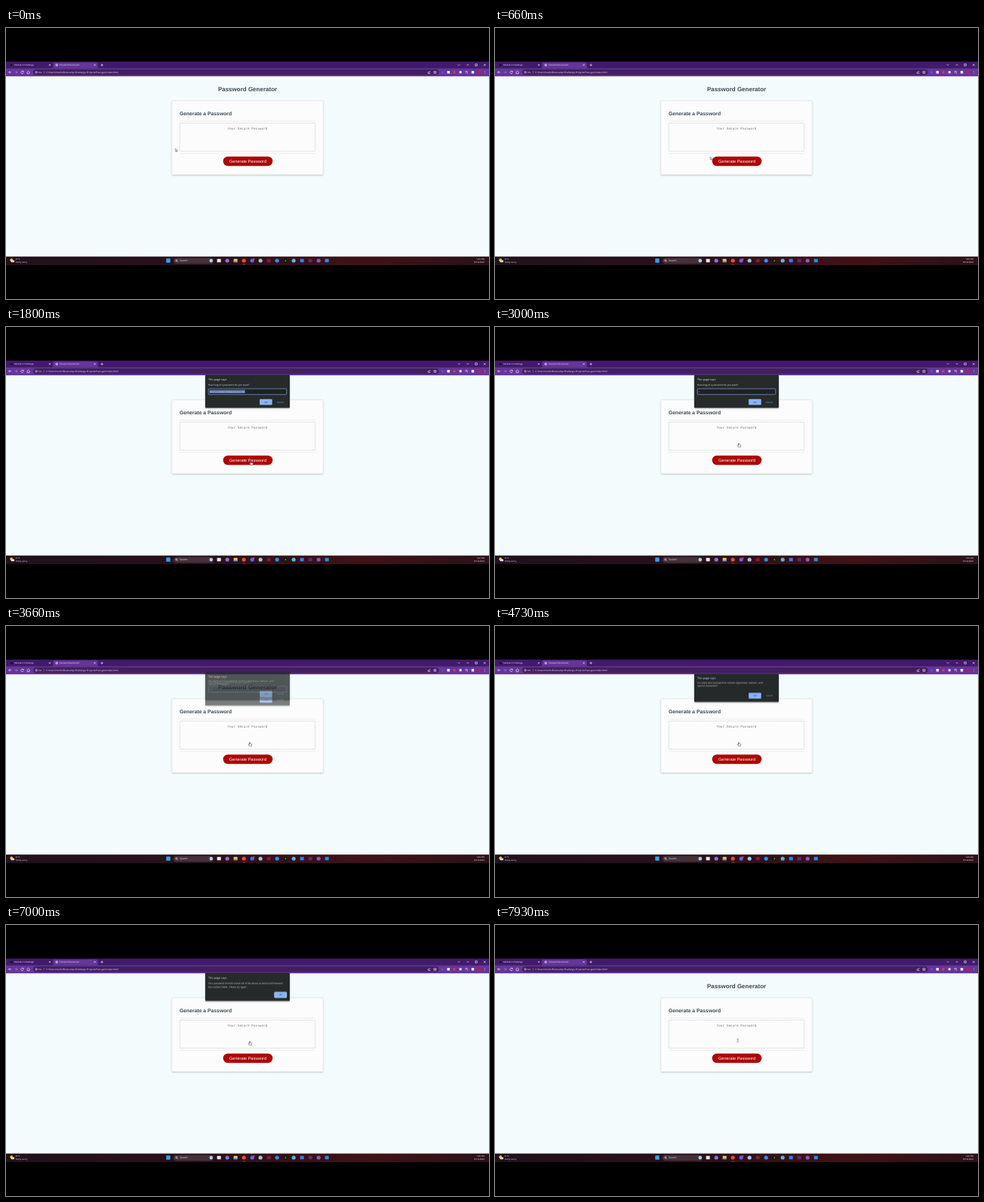
These frames come from a looping animation (640x360 px, 8000 ms). An HTML page:

```html
<!DOCTYPE html>
<html lang="en">
<head>
<meta charset="utf-8">
<title>Password Generator</title>
<style>
  html, body { margin: 0; width: 100%; height: 100%; overflow: hidden; background: #000; }
  svg { display: block; width: 100vw; height: 100vh; }
  text { font-family: "Open Sans", "Noto Sans", sans-serif; text-rendering: geometricPrecision; white-space: pre; }
  .page text { font-family: "Liberation Sans", Arial, sans-serif; fill: #3b4954; }
  .page .mono { font-family: "Liberation Mono", monospace; fill: #777; }
  .ui { font-size: 2.8px; fill: #f1eaf8; }
  .line { fill: none; stroke: #eee6f6; stroke-width: .65; }
  .dialog text { font-size: 3.08px; fill: #e4e6e9; }
  .dialog .head { font-size: 3.65px; }
  .dialog .ok { font-size: 2.9px; fill: #24334f; text-anchor: middle; }
  .dialog .cancel { font-size: 2.9px; fill: #8ab4f8; text-anchor: middle; }
  .dialog .value { font-size: 2.8px; }
  .dialog, .pointer, .entry { opacity: 0; }
</style>
</head>
<body>
<svg viewBox="0 0 640 360" preserveAspectRatio="none">
  <defs>
    <linearGradient id="bar">
      <stop offset="0" stop-color="#21111c"/>
      <stop offset=".4" stop-color="#29101a"/>
      <stop offset=".75" stop-color="#401218"/>
      <stop offset="1" stop-color="#2b1119"/>
    </linearGradient>
    <filter id="soft" x="-10%" y="-10%" width="120%" height="125%">
      <feDropShadow dx="0" dy=".6" stdDeviation="1" flood-opacity=".28"/>
    </filter>
  </defs>
  <rect width="640" height="360"/>

  <g class="page">
    <rect y="64" width="640" height="240" fill="#f4fbfc"/>
    <text x="320" y="84.2" font-size="8" font-weight="700" text-anchor="middle">Password Generator</text>
    <rect x="220" y="97" width="200" height="97.7" rx="1" fill="#fcfcfc" stroke="#d8dadb" stroke-width=".3" filter="url(#soft)"/>
    <text x="230" y="115.7" font-size="6.8" font-weight="700">Generate a Password</text>
    <path d="M230 123.6H410M230 166.6H410" stroke="#dcdede" stroke-width=".5"/>
    <rect x="230.3" y="126.3" width="179.4" height="37.4" rx=".8" fill="#fcfcfc" stroke="#b4b7b9" stroke-width=".55" stroke-dasharray="1.5 .9"/>
    <text class="mono" x="320" y="134.9" font-size="4.42" text-anchor="middle">Your Secure Password</text>
    <rect x="287.7" y="170.8" width="65.6" height="12.5" rx="6.2" fill="#ae0505"/>
    <text x="320.5" y="178.8" font-size="5.55" text-anchor="middle" style="fill:#fff">Generate Password</text>
  </g>

  <g id="browser">
    <rect y="44.6" width="640" height="9" fill="#421a6c"/>
    <path d="M61 53.6Q62.5 53.4 62.5 51.6V47.4Q62.5 45.8 64 45.8H120Q121.5 45.8 121.5 47.4V51.6Q121.5 53.4 123 53.6Z" fill="#66359b"/>
    <rect y="53.4" width="640" height="10.8" fill="#66359b"/>
    <rect x="36" y="55" width="537.5" height="7.6" rx="3.8" fill="#41205f"/>
    <circle cx="7.2" cy="49.2" r="1.5" fill="#17111d"/>
    <circle cx="67.2" cy="49.2" r="1.3" class="line"/>
    <path d="M66 49.2H68.4" class="line"/>
    <g class="ui">
      <text x="11" y="50.2">Module 3 Challenge</text>
      <text x="71" y="50.2">Password Generator</text>
      <text x="43" y="59.9">File</text>
      <text x="53" y="60" font-size="3.08">C:/Users/marlo/Bootcamp/Challenge-Projects/Pass-gen/index.html</text>
    </g>
    <g class="line">
      <path d="M57 48.2l2 2m0-2l-2 2M116.6 48.2l2 2m0-2l-2 2M125.4 49.2h3.4m-1.7-1.7v3.4"/>
      <path d="M598.8 48.3l1.3 1.3 1.3-1.3M610.6 49h2.8M621.8 47.8h2.5v2.5h-2.5zM633 47.8l2.6 2.6m0-2.6l-2.6 2.6"/>
      <path d="M7.2 58.8H3.6m1.6-1.6l-1.6 1.6 1.6 1.6"/>
      <path d="M11.4 58.8H15m-1.6-1.6l1.6 1.6-1.6 1.6" opacity=".45"/>
      <path d="M23 58a1.7 1.7 0 1 0 .2 1.4M23.2 56.9v1.3h-1.3"/>
      <path d="M27.6 58.8l2-1.8 2 1.8M28.2 58.5v2.2h2.8v-2.2"/>
      <circle cx="40.2" cy="58.8" r="1.2"/>
      <path d="M50.3 57.2v3.2" opacity=".5"/>
      <path d="M559.3 58.2v2.2h2.7v-1M560.3 59q.3-1.4 2-1.4"/>
      <path d="M568.4 56.9l.6 1.3 1.4.1-1.1.9.4 1.4-1.3-.8-1.2.8.3-1.4-1.1-.9 1.4-.1z"/>
      <path d="M608.6 57.6h3.2M608.6 59h2M611.4 58.6v2"/>
    </g>
  </g>

  <g id="taskbar">
    <rect y="303.6" width="640" height="11.4" fill="url(#bar)"/>
    <circle cx="7.3" cy="308.3" r="2" fill="#f5bd34"/>
    <rect x="6.5" y="308.6" width="4.8" height="2.7" rx="1.3" fill="#d9dde3"/>
    <rect x="222" y="305.4" width="53" height="7.8" rx="3.9" fill="#443039"/>
    <circle cx="225.8" cy="308.8" r="1.1" class="line"/>
    <path d="M226.6 309.6l1.1 1.1" class="line"/>
    <rect x="313.3" y="313.7" width="4" height=".6" rx=".3" fill="#d26a74"/>
    <g class="ui">
      <text x="12.8" y="308.2" font-size="2.7">81°F</text>
      <text x="12.8" y="311.8" font-size="2.7">Partly sunny</text>
      <text x="230" y="310.2" font-size="3.4">Search</text>
      <g text-anchor="end" font-size="2.9">
        <text x="634" y="308.2">1:49 PM</text>
        <text x="634" y="312">8/10/2023</text>
      </g>
    </g>
  </g>

  <g class="dialog" id="prompt">
    <text x="268" y="78.3">How long of a password do you want?</text>
    <rect x="268.2" y="82" width="103.6" height="7.7" rx=".9" fill="#1f2023" stroke="#8ab4f8" stroke-width=".6"/>
    <g class="entry" id="hint">
      <rect x="269.6" y="83.6" width="47.2" height="4.4" fill="#5878a8"/>
      <text class="value" x="270" y="86.9">Enter a number between 8 and 128</text>
    </g>
    <text class="value entry" id="digit1" x="270" y="86.9">1</text>
    <text class="value entry" id="digit2" x="271.6" y="86.9">2</text>
  </g>
  <g class="dialog" id="confirm">
    <text x="268" y="76.3">You want your password to contain uppercase, numeric, and</text>
    <text x="268" y="80.9">special characters?</text>
  </g>
  <g class="dialog" id="alert">
    <text x="268" y="78.3">Your password should contain all of the above as well as full between</text>
    <text x="268" y="83">the number fields.  Please try again.</text>
  </g>

  <g id="mouse">
    <path class="pointer" id="arrow" d="M0 0V4.1L1 3.2 1.6 4.6 2.2 4.3 1.6 3H2.9Z" fill="#fff" stroke="#111" stroke-width=".4"/>
    <path class="pointer" id="hand" d="M-.5 .4Q0-.2.5.4V2L2.4 2.4Q2.9 2.6 2.8 3.2L2.3 5.2H-.5L-1.9 3.2Q-1.9 2.4-1.2 2.6L-.5 3.2Z" fill="#fff" stroke="#111" stroke-width=".45"/>
    <path class="pointer" id="beam" d="M-1-2.2Q0-2.2 0-1.6Q0-2.2 1-2.2M0-1.6V1.8M-1 2.3Q0 2.3 0 1.8Q0 2.3 1 2.3" fill="none" stroke="#222" stroke-width=".45"/>
  </g>
</svg>
<script>
const LOOP = 8000;
const byId = id => document.getElementById(id);
const dot = (x, y, r, fill) => `<circle cx="${x}" cy="${y}" r="${r}" fill="${fill}"/>`;
const box = (x, y, w, fill, h = w, rx = .5) =>
  `<rect x="${x - w / 2}" y="${y - h / 2}" width="${w}" height="${h}" rx="${rx}" fill="${fill}"/>`;
const append = (id, markup) => byId(id).insertAdjacentHTML('beforeend', markup);

append('browser',
  dot(578.5, 58.8, 1.6, '#3a62d8') + box(586.3, 58.8, 3.6, '#e8e4f2') +
  dot(594, 58.8, 1.7, '#d8404a') + box(602.2, 58.8, 3, '#f2eef8') +
  box(618.5, 58.8, 3.4, '#f2eef8') + dot(627, 58.8, 2.1, '#c81d38') +
  [57.3, 58.8, 60.3].map(y => dot(634.3, y, .4, '#fff')).join(''));

// Taskbar icons sit on an even 11 px pitch: 'o' round, 's' square.
const icons = [
  's#e6e8ee', 'o#7c78d8', 's#f4c84a', 'o#e0503c', 'o#5865f2', 'o#9fc4e4', 's#7a1f3c',
  'o#2f8fe8', 's#101a12', 'o#58b8dc', 's#3a7bea', 's#5c2a6e', 'o#8a55c8', 's#2590dc'
];
append('taskbar', box(215, 309, 5.4, '#2ea3ee') + dot(271.8, 309.1, 2.3, '#a5d4ee') +
  icons.map((icon, i) => {
    const x = 282.2 + 11 * i, fill = icon.slice(1);
    return icon[0] === 'o' ? dot(x, 309, 2.6, fill) : box(x, 309, 5, fill, 4.6);
  }).join('') + dot(328.4, 307.2, 1.1, '#e23b44') + box(304.2, 310.2, 5, '#4a9be0', 1.4, .2) +
  dot(370.4, 309.2, .9, '#44b54a'));

const button = (x, y) => box(x, y, 16.6, '#8ab4f8', 7.8, 1) + `<text class="ok" x="${x}" y="${y + 1}">OK</text>`;

function dress(id, bottom, okX, okY, cancel) {
  const el = byId(id);
  el.insertAdjacentHTML('afterbegin',
    `<rect x="264" y="63.6" width="112" height="${bottom - 63.6}" rx="1" fill="#28292c" filter="url(#soft)"/>
     <text class="head" x="268" y="${id === 'confirm' ? 70.4 : 71.3}">This page says</text>`);
  append(id, button(okX, okY) + (cancel ? `<text class="cancel" x="363.5" y="${okY + 1}">Cancel</text>` : ''));
}
dress('prompt', 107.6, 344.4, 99.7, true);
dress('confirm', 101, 344.4, 92.6, true);
dress('alert', 101, 363.8, 92.8, false);
append('alert', '<rect x="355.9" y="89.3" width="15.8" height="7" rx=".9" fill="none" stroke="#c3d8fb" stroke-width=".5"/>');

// Steps are [ms, properties, easing to the next step].
function play(el, steps) {
  const frames = steps.map(([ms, props, easing = 'linear']) => ({ offset: ms / LOOP, easing, ...props }));
  el.animate(frames, { duration: LOOP, iterations: Infinity });
}

function show(id, from, to) {
  const frames = [[0, { opacity: from ? 0 : 1 }, 'step-end']];
  if (from) frames.push([from, { opacity: 1 }, 'step-end']);
  if (to < LOOP) frames.push([to, { opacity: 0 }, 'step-end']);
  frames.push([LOOP, { opacity: to < LOOP ? 0 : 1 }]);
  play(byId(id), frames);
}

function slide(id, open, opened, close, closed) {
  const away = { opacity: 0, transform: 'translateY(-4.5px)' };
  const rest = { opacity: 1, transform: 'translateY(0px)' };
  play(byId(id), [[0, away], [open, away, 'ease-out'], [opened, rest], [close, rest], [closed, away], [LOOP, away]]);
}

slide('prompt', 1300, 1660, 3530, 3860);
slide('confirm', 3530, 3930, 4730, 5000);
slide('alert', 4730, 5060, 7330, 7660);

show('hint', 0, 3000);
show('digit1', 3000, 4500);
show('digit2', 3200, 4500);

show('arrow', 0, 800);
show('hand', 800, 7860);
show('beam', 7860, LOOP);

const at = (x, y) => ({ transform: `translate(${x}px, ${y}px)` });
play(byId('mouse'), [
  [0, at(224.5, 160)], [60, at(224.5, 160), 'ease-in-out'],
  [1130, at(324.6, 178)], [1800, at(324.6, 178), 'ease-in-out'],
  [2130, at(323, 154.3)], [7860, at(323, 154.3)],
  [7930, at(321.6, 153.3)], [LOOP, at(321.6, 153.3)]
]);
</script>
</body>
</html>
```
